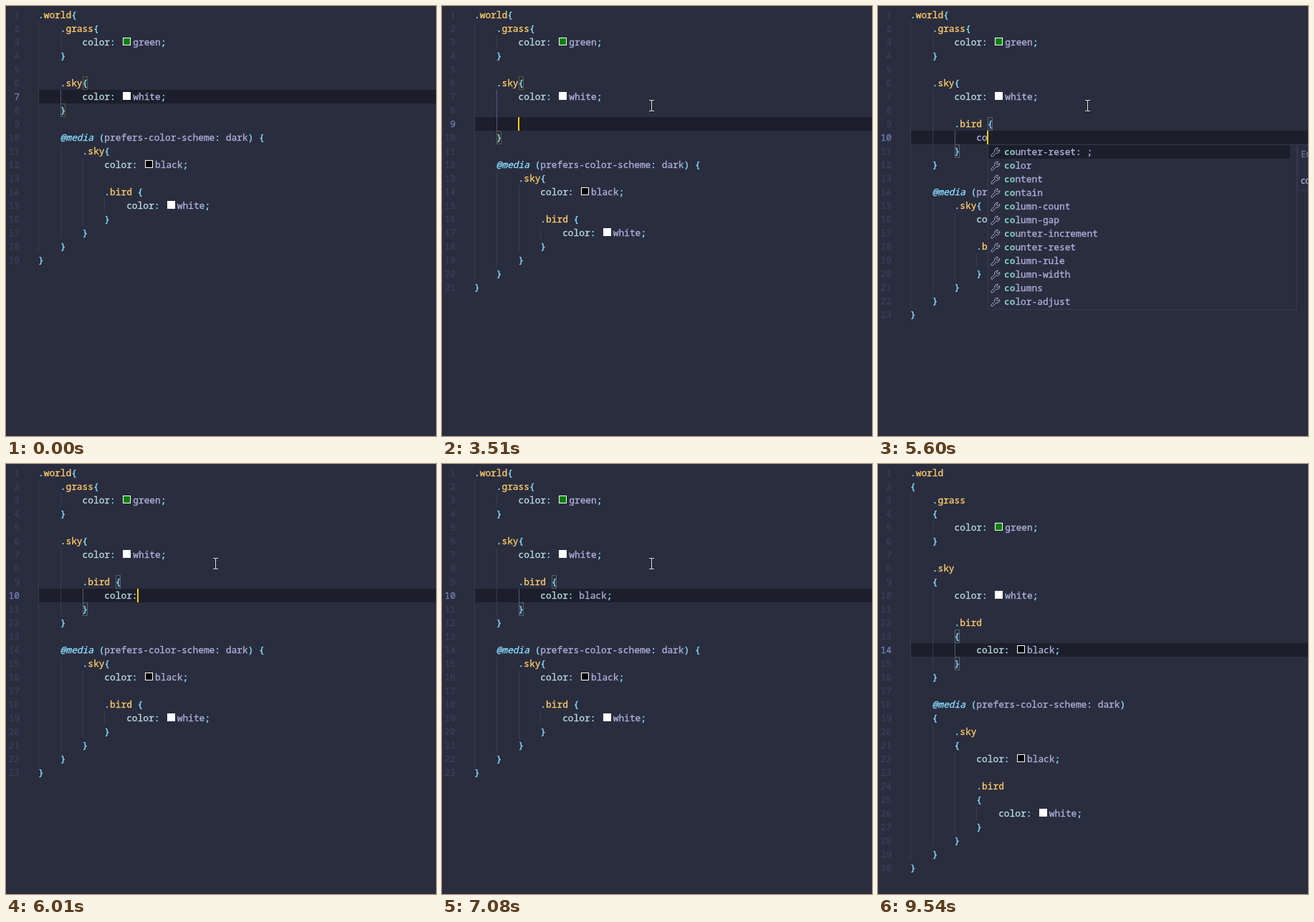
Recreate the animation shown at these times as an HTML page. Size 600 by 600 pixels, loop 9.6 s.

```html
<!DOCTYPE html>
<html lang="en">
<head>
<meta charset="utf-8">
<title>Nested styles</title>
<style>
  html, body { margin: 0; width: 100%; height: 100%; overflow: hidden; background: #292d3e; }
  svg { display: block; width: 600px; height: 600px; }
  text { font: 12.83px "Noto Sans Mono", monospace; white-space: pre; stroke-width: .35px; }
  .b { font-weight: 700; fill: #80cbc4; stroke: none; }
  .i { font-style: italic; }
  .ui { font: 12.5px "Noto Sans", sans-serif; }
</style>
</head>
<body>
<svg id="stage" viewBox="0 0 600 600"></svg>
<script>
const LOOP = 9600, LEFT = 45, CW = 7.697, LH = 19, TOP = 3, SWATCH = 16.8;
const C = {
  bg: '#292d3e', line: '#1c1f2b', num: '#3a3f58', numOn: '#717cb4', guide: '#363b52', guideOn: '#505778',
  punct: '#89ddff', cls: '#ffcb6b', prop: '#b8d8e2', value: '#aaafd8', dim: '#676e95', caret: '#ffcc00'
};
const stage = document.getElementById('stage');
const pad = n => ' '.repeat(n);

const HEAD = ['.world{', pad(4) + '.grass{', pad(8) + 'color: green;', pad(4) + '}', pad(4),
  pad(4) + '.sky{', pad(8) + 'color: white;'];
const TAIL = [pad(4) + '}', pad(4), pad(4) + '@media (prefers-color-scheme: dark) {',
  pad(8) + '.sky{', pad(12) + 'color: black;', pad(12), pad(12) + '.bird {',
  pad(16) + 'color: white;', pad(12) + '}', pad(8) + '}', pad(4) + '}', '}'];

const LISTS = {
  cls: ['.bird', '.grass', '.sky', '.world'],
  prop: ['counter-reset: ;', 'color', 'content', 'contain', 'column-count', 'column-gap',
    'counter-increment', 'counter-reset', 'column-rule', 'column-width', 'columns', 'color-adjust'],
  value: ['beige #f5f5dc', 'bisque #ffe4c4', 'black #000000', 'blanchedalmond #ffebcd', 'blue #0000ff',
    'blue', 'blueviolet #8a2be2', 'brown #a52a2a', 'burlywood #deb887']
};

// [start, typed text, popup list]
const SELECTOR = [[2530, ''], [4120, '.'], [4200, '.', 'cls'], [4290, '.b', 'cls'], [4390, '.bi', 'cls'],
  [4480, '.bir', 'cls'], [4710, '.bird', 'cls'], [4910, '.bird '], [4980, '.bird {}']];
const RULE = [[5220, ''], [5450, 'co'], [5600, 'co', 'prop'], [5700, 'col', 'prop'], [5770, 'colo', 'prop'],
  [5840, 'color', 'prop'], [5930, 'color:'], [6030, 'color: '], [6170, 'color: b', 'value'],
  [6290, 'color: bl', 'value'], [6390, 'color: bla', 'value'], [6450, 'color: blac', 'value'],
  [6520, 'color: black', 'value'], [6570, 'color: black;']];
const BLINKS = [320, 800, 1280, 2220, 2530, 2990, 3510, 3970, 4120, 7080, 7260, 7770, 8230, 8710, 9260, 9540];
const ENTER = [[30, 516, 592], [250, 474, 430], [480, 350, 205], [650, 301, 123], [800, 293, 129], [920, 292, 139]];
const LEAVE = [[8630, 292, 139], [8640, 306, 190], [8690, 350, 340], [8740, 403, 498], [8790, 403, 498]];

const last = (steps, t) => steps.filter(s => s[0] <= t).pop();
const indent = s => s.match(/^ */)[0].length;
const lineY = row => TOP + row * LH;
const colX = col => LEFT + col * CW;

const rect = (x, y, w, h, fill, extra = '') =>
  `<rect x="${x}" y="${y}" width="${w}" height="${h}" fill="${fill}" ${extra}/>`;
const text = (x, y, s, fill, extra = '') =>
  `<text x="${x.toFixed(2)}" y="${y}" fill="${fill}" stroke="${fill}" ${extra}>${s}</text>`;
const path = (x, y, d, stroke, w = 1) =>
  `<path transform="translate(${x} ${y})" d="${d}" fill="none" stroke="${stroke}" stroke-width="${w}"/>`;

const ICONS = {
  cls: ['M.5 2.5h6v3h-6zM8 2.5h6M9 5.5h4M0 8.5h8M10 8.5h4M0 11.5h5M7 11.5h6M0 14h11', '#a6accd'],
  prop: ['M12.6 3.4 10.6 5.4 8.9 5.1 8.6 3.4 10.6 1.4A3.8 3.8 0 0 0 5.8 6.2L1.2 10.8A1.4 1.4 0 0 0 3.2 12.8' +
    'L7.8 8.2A3.8 3.8 0 0 0 12.6 3.4Z', '#a6accd'],
  value: ['M7 .8 12.6 3.5V10L7 13.2 1.4 10V3.5ZM1.4 3.5 7 6.4 12.6 3.5M7 6.4V13.2', '#b180d7']
};

function documentAt(t) {
  let edit = [], row = 6, step = null;
  if (t >= 1740) { edit = [pad(8)]; row = 7; }
  if (t >= 2530) {
    step = last(SELECTOR, t);
    edit.push(pad(8) + step[1]);
    row = 8;
  }
  if (t >= 5220) {
    step = last(RULE, t);
    edit = [pad(8), pad(8) + '.bird {', pad(12) + step[1], pad(8) + '}'];
    row = 9;
  }
  let lines = [...HEAD, ...edit, ...TAIL];
  if (t >= 7260) {
    lines = lines.flatMap(s => s.endsWith('{') ? [s.slice(0, -1).trimEnd(), pad(indent(s)) + '{'] : [s]);
    row = 13;
  }
  const list = step && step[2];
  return { lines, row, list, query: list ? step[1].split(' ').pop() : '' };
}

function enclosing(lines, row) {
  const depth = indent(lines[row]);
  let open = row - 1, close = row + 1;
  while (!(lines[open].endsWith('{') && indent(lines[open]) < depth)) open--;
  while (!(lines[close].endsWith('}') && indent(lines[close]) < depth)) close++;
  return { open, close };
}

function drawLine(s, row, swatches) {
  const y = lineY(row), base = y + 14;
  const hit = swatches && s.match(/color: (green|white|black);/);
  const split = hit ? indent(s) + 7 : Infinity;
  let out = '';
  for (const m of s.matchAll(/@\w+|\.\w+|color(?=:)|[\w-]+|[{}():;.]/g)) {
    const w = m[0], x = colX(m.index) + (m.index >= split ? SWATCH : 0);
    if (w[0] === '@') out += text(x, base, w, C.punct, 'class="i"');
    else if (w[0] === '.' && w[1]) out += text(x, base, '.', C.punct) + text(x + CW, base, w.slice(1), C.cls);
    else if (/^[{}():;.]/.test(w)) out += text(x, base, w, C.punct);
    else out += text(x, base, w, w === 'color' ? C.prop : C.value);
  }
  if (hit) out += rect(Math.round(colX(split) + 2.8) + .5, y + 3.5, 10, 10, hit[1], 'stroke="#fff"');
  return out;
}

function drawGuides(lines, on) {
  const col = indent(lines[on.open]);
  let out = '';
  lines.forEach((s, row) => {
    for (let c = 0; c < indent(s); c += 4) {
      const active = c === col && row > on.open && row < on.close;
      out += rect(Math.round(colX(c)), lineY(row), 1, LH, active ? C.guideOn : C.guide);
    }
  });
  return out;
}

// Letters of the query are matched in order, as in a fuzzy finder.
function mark(word, query) {
  let i = 0;
  const html = [...word].map(ch => ch === query[i] ? (i++, `<tspan class="b">${ch}</tspan>`) : ch).join('');
  return i === query.length ? html : null;
}

function drawPopup(list, query, x, y) {
  const rows = LISTS[list].map(item => {
    const [, word, hex] = item.match(/^(.*?)(?: (#\w+))?$/);
    return { html: mark(word, query), hex };
  }).filter(r => r.html);
  const h = rows.length * LH + 2;
  let out = rect(x + .5, y + .5, 431, h, C.bg, 'stroke="#353a50"');
  out += rect(x + 1, y + 1, list === 'prop' ? 421 : 430, LH, C.line);
  rows.forEach(({ html, hex }, i) => {
    const top = y + 1 + i * LH;
    if (hex) {
      out += rect(x + 7.5, top + 2.5, 12, 12, hex, 'stroke="#000"');
      out += text(x + 367, top + 14, hex, '#777d9c');
    } else {
      out += path(x + 4, top + 3, ...ICONS[list]);
    }
    out += text(x + (hex ? 24 : 23), top + 14, html, C.value);
  });
  if (list === 'prop') {
    out += rect(x + 432.5, y + .5, 300, 64, C.bg, 'stroke="#353a50"');
    out += text(x + 437, y + 18, 'En', C.dim, 'class="ui"') + text(x + 437, y + 55, 'co', C.value, 'class="ui"');
  }
  return out;
}

function along(keys, t) {
  const i = keys.findIndex(k => k[0] > t), a = keys[i - 1], b = keys[i];
  const k = (t - a[0]) / (b[0] - a[0]);
  return [a[1] + (b[1] - a[1]) * k, a[2] + (b[2] - a[2]) * k];
}

function drawMouse(t) {
  if (t < 30 || t >= 8790) return '';
  let p = [292, 139];
  if (t < 920) p = along(ENTER, 30 + Math.floor((t - 30) / 47) * 47);
  else if (t >= 8640) p = along(LEAVE, 8640 + Math.floor((t - 8640) / 50) * 50);
  const d = 'M-3 -7.5H-.5L.5 -6.5 1.5 -7.5H4M.5 -7V7M-3 7.5H-.5L.5 6.5 1.5 7.5H4';
  const [x, y] = p.map(Math.round);
  return path(x, y, d, '#14161f', 2.4) + path(x, y, d, '#e4e4e4', 1.1);
}

function draw(t) {
  const { lines, row, list, query } = documentAt(t);
  const current = lines[row], paired = current.endsWith('{}');
  const block = enclosing(lines, row);
  const guide = row === 9 && t < 5450 ? enclosing(lines, 8) : block;
  const col = current.length - (paired ? 1 : 0);
  const hasSwatch = row === 6 || t >= 7340;
  const caretX = Math.floor(colX(col) - .5 + (hasSwatch ? SWATCH : 0));
  const y = lineY(row);

  let out = rect(45, y, 555, LH, C.line) + drawGuides(lines, guide);

  const braces = paired ? [[row, col - 1], [row, col]]
    : [[block.open, lines[block.open].length - 1], [block.close, indent(lines[block.close])]];
  for (const [r, c] of braces) {
    out += rect(Math.round(colX(c)) + .5, lineY(r) + .5, 6, 18, 'none', `stroke="${t < 4980 ? '#5f5836' : '#56626a'}"`);
  }

  lines.forEach((s, i) => {
    out += text(19, lineY(i) + 14, i + 1, i === row ? C.numOn : C.num, 'text-anchor="end"');
    out += drawLine(s, i, i !== row || hasSwatch);
  });
  if (BLINKS.filter(b => b <= t).length % 2) out += rect(caretX, y, 2, LH, C.caret);
  if (list) out += drawPopup(list, query, caretX + 1, y + LH);
  return out + drawMouse(t);
}

let shown = '';
const start = performance.now();
function tick() {
  const next = draw((performance.now() - start) % LOOP);
  if (next !== shown) stage.innerHTML = shown = next;
  requestAnimationFrame(tick);
}
tick();
</script>
</body>
</html>
```
